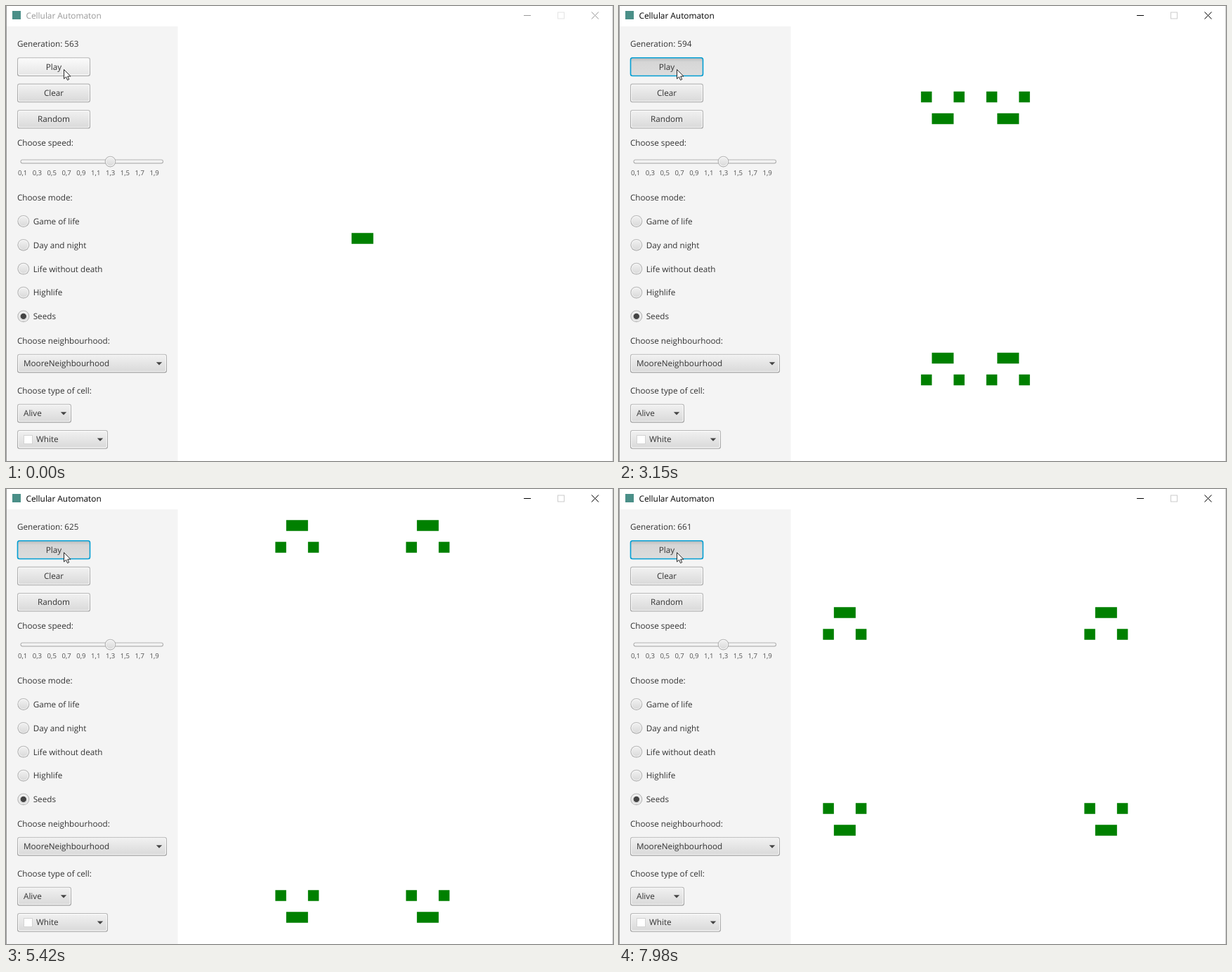
An HTML page that plays this animation: 864x648 px, repeating every 8 s.

```html
<!DOCTYPE html>
<html lang="en">
<head>
<meta charset="utf-8">
<title>Cellular Automaton</title>
<style>
  html, body { margin: 0; width: 100%; height: 100%; overflow: hidden; background: #fff; }
  svg { display: block; }
  text { font: 11.7px "Open Sans", "Noto Sans", sans-serif; fill: #333; text-rendering: geometricPrecision; }
  .mid { text-anchor: middle; }
  .tick { font-size: 9.6px; fill: #505050; text-anchor: middle; }
  .edge { fill: url(#border); }
  .face { fill: url(#face); }
  .arrow { fill: #444; }
  #title { font-size: 11.85px; fill: #999; }
  #controls { stroke: #999; }
  #maximize { stroke: #e4e4e4; }
  .active #title { fill: #000; }
  .active #controls { stroke: #000; }
  .active #maximize { stroke: #ccc; }
  #hover { fill: url(#light); }
  #ring, #pressed { display: none; }
  .active #ring, .playing #pressed { display: inline; }
  .active #hover { fill: url(#armed); }
</style>
</head>
<body>
<svg id="stage" width="864" height="648" viewBox="0 0 864 648">
  <defs>
    <linearGradient id="border" x2="0" y2="1"><stop stop-color="#b8b8b8"/><stop offset="1" stop-color="#a0a0a0"/></linearGradient>
    <linearGradient id="face" x2="0" y2="1"><stop stop-color="#f0f0f0"/><stop offset="1" stop-color="#dadada"/></linearGradient>
    <linearGradient id="light" x2="0" y2="1"><stop stop-color="#fafafa"/><stop offset="1" stop-color="#e6e6e6"/></linearGradient>
    <linearGradient id="armed" x2="0" y2="1"><stop stop-color="#e4e4e4"/><stop offset="1" stop-color="#d0d0d0"/></linearGradient>
    <linearGradient id="sunk" x2="0" y2="1"><stop stop-color="#bdbdbd"/><stop offset=".22" stop-color="#d6d6d6"/><stop offset="1" stop-color="#dcdcdc"/></linearGradient>
  </defs>
  <rect width="864" height="648" fill="#fff"/>
  <rect x="1" y="29" width="243.5" height="619" fill="#f4f4f4"/>
  <path d="M.5 0V648" stroke="#999"/>
  <path d="M863.5 0V648" stroke="#ccc"/>
  <rect x="9" y="7" width="12" height="12" fill="#4a8f88"/>
  <text id="title" x="28.5" y="18">Cellular Automaton</text>
  <g id="controls" fill="none">
    <path d="M737 13.5h10M833.5 8.5l10 10m0-10l-10 10"/>
    <rect id="maximize" x="785.5" y="9" width="9" height="9"/>
  </g>
  <path id="cells" fill="#008000"/>
  <text id="count" x="16" y="58"></text>
  <g id="panel"></g>
  <path d="M82.5 90.5v13.2l3-2.8 2 4.6 2.2-1-2-4.4h4.2z" fill="#fff" stroke="#111" stroke-width=".9"/>
</svg>
<script>
const $ = id => document.getElementById(id);

// ---- control panel ----
const label = (s, x, y, cls = '') => `<text class="${cls}" x="${x}" y="${y}">${s}</text>`;
const rect = (x, y, w, h, r, attrs) => `<rect x="${x}" y="${y}" width="${w}" height="${h}" rx="${r}" ${attrs}/>`;
const HEIGHT = 26.7, PITCH = 37.3, PLAY = 73.3;
const inset = (y, w, d, attrs) => rect(16 + d, y + d, w - 2 * d, HEIGHT - 2 * d, 3.2 - d * 0.8, attrs);
const box = (y, w, attrs = 'class="face"') =>
  inset(y, w, 0, 'class="edge"') + inset(y, w, 1.07, 'fill="#fbfbfb"') + inset(y, w, 2.13, attrs);
const button = (s, y) => box(y, 104) + label(s, 68, y + 17.4, 'mid');
const combo = (s, y, w, x = 25) => box(y, w) + label(s, x, y + 17.4) +
  `<path class="arrow" d="M${w + 0.8} ${y + 11.5}h8.4l-4.2 4.3z"/>`;
const knob = (x, y, r) => `<circle class="edge" cx="${x}" cy="${y}" r="${r}"/>` +
  `<circle cx="${x}" cy="${y}" r="${r - 1}" fill="#fbfbfb"/>` +
  `<circle class="face" cx="${x}" cy="${y}" r="${r - 1.8}"/>`;

let ui = box(PLAY, 104, 'id="hover"') +
  `<g id="pressed">${inset(PLAY, 104, 1, 'fill="url(#sunk)"')}</g>` +
  inset(PLAY, 104, 0.5, 'id="ring" fill="none" stroke="#039ed3" stroke-width="1.6"') +
  label('Play', 68, 91, 'mid') + button('Clear', PLAY + PITCH) + button('Random', PLAY + 2 * PITCH);

ui += label('Choose speed:', 16, 198.5) + rect(20.5, 218.4, 203.5, 6.2, 3, 'class="edge"') +
  rect(21.5, 219.4, 201.5, 4.2, 2, 'fill="#f3f3f3"') + knob(148.5, 221.6, 7.8);
for (let i = 0; i < 10; i++)
  ui += label((0.1 + i * 0.2).toFixed(1).replace('.', ','), 23.6 + i * 20.83, 241, 'tick');

ui += label('Choose mode:', 16, 277);
['Game of life', 'Day and night', 'Life without death', 'Highlife', 'Seeds'].forEach((s, i) => {
  const y = 306.5 + i * 33.85;
  ui += knob(24.8, y, 8.4) + label(s, 38.7, y + 4.3);
  if (s === 'Seeds') ui += `<circle cx="24.8" cy="${y}" r="4.2" fill="#444"/>`;
});

ui += label('Choose neighbourhood:', 16, 480.5) + combo('MooreNeighbourhood', 495.7, 213) +
  label('Choose type of cell:', 16, 551.5) + combo('Alive', 566.7, 77) + combo('White', 566.7 + PITCH, 129, 43) +
  rect(25.5, 611.5, 12, 12, 0, 'fill="#fff" stroke="#d4d4d4"');
$('panel').innerHTML = ui;

// ---- Seeds automaton on a torus: a cell is born with exactly two neighbours, every live cell dies ----
const N = 40, SIZE = 15.5, LEFT = 243.85, TOP = 28.7, FIRST = 563;
const wrap = v => (v + N) % N;

function next(live) {
  const sums = new Map();
  for (const k of live)
    for (let dy = -1; dy < 2; dy++)
      for (let dx = -1; dx < 2; dx++) {
        const n = wrap((k / N | 0) + dy) * N + wrap(k % N + dx);
        sums.set(n, (sums.get(n) || 0) + 1);
      }
  return new Set([...sums.keys()].filter(k => sums.get(k) === 2 && !live.has(k)));
}

// One path for all cells, so that neighbours join without a seam
const outline = live => [...live].map(k =>
  `M${LEFT + k % N * SIZE} ${TOP + (k / N | 0) * SIZE}h${SIZE}v${SIZE}h${-SIZE}z`).join('');

const paths = [];
for (let i = 0, live = new Set([19 * N + 16, 19 * N + 17]); i < 99; i++, live = next(live))
  paths.push(outline(live));

// ---- timeline: [ms, generations passed], even steps in between ----
const LOOP = 8000, FOCUS = 710, START = 910;
const pace = [
  [910, 1], [1700, 12], [1820, 13], [2490, 22], [2570, 23], [2640, 24], [3400, 35], [3460, 36], [3770, 40],
  [3820, 41], [4190, 46], [4280, 47], [4630, 52], [4680, 53], [5080, 58], [5150, 59], [5940, 70], [6000, 71],
  [6150, 73], [6230, 74], [6750, 81], [6810, 82], [7170, 87], [7220, 88], [7600, 93], [7700, 94], [7980, 98]
];

function stepAt(t) {
  if (t < START) return 0;
  const i = pace.findLastIndex(p => p[0] <= t), [t0, g0] = pace[i];
  if (i === pace.length - 1) return g0;
  const [t1, g1] = pace[i + 1];
  return g0 + Math.floor((t - t0) / (t1 - t0) * (g1 - g0));
}

function draw() {
  const t = performance.now() % LOOP, step = stepAt(t), list = $('stage').classList;
  list.toggle('active', t >= FOCUS);
  list.toggle('playing', t >= START);
  $('cells').setAttribute('d', paths[step]);
  $('count').textContent = 'Generation: ' + (FIRST + step);
  requestAnimationFrame(draw);
}
draw();
</script>
</body>
</html>
```
